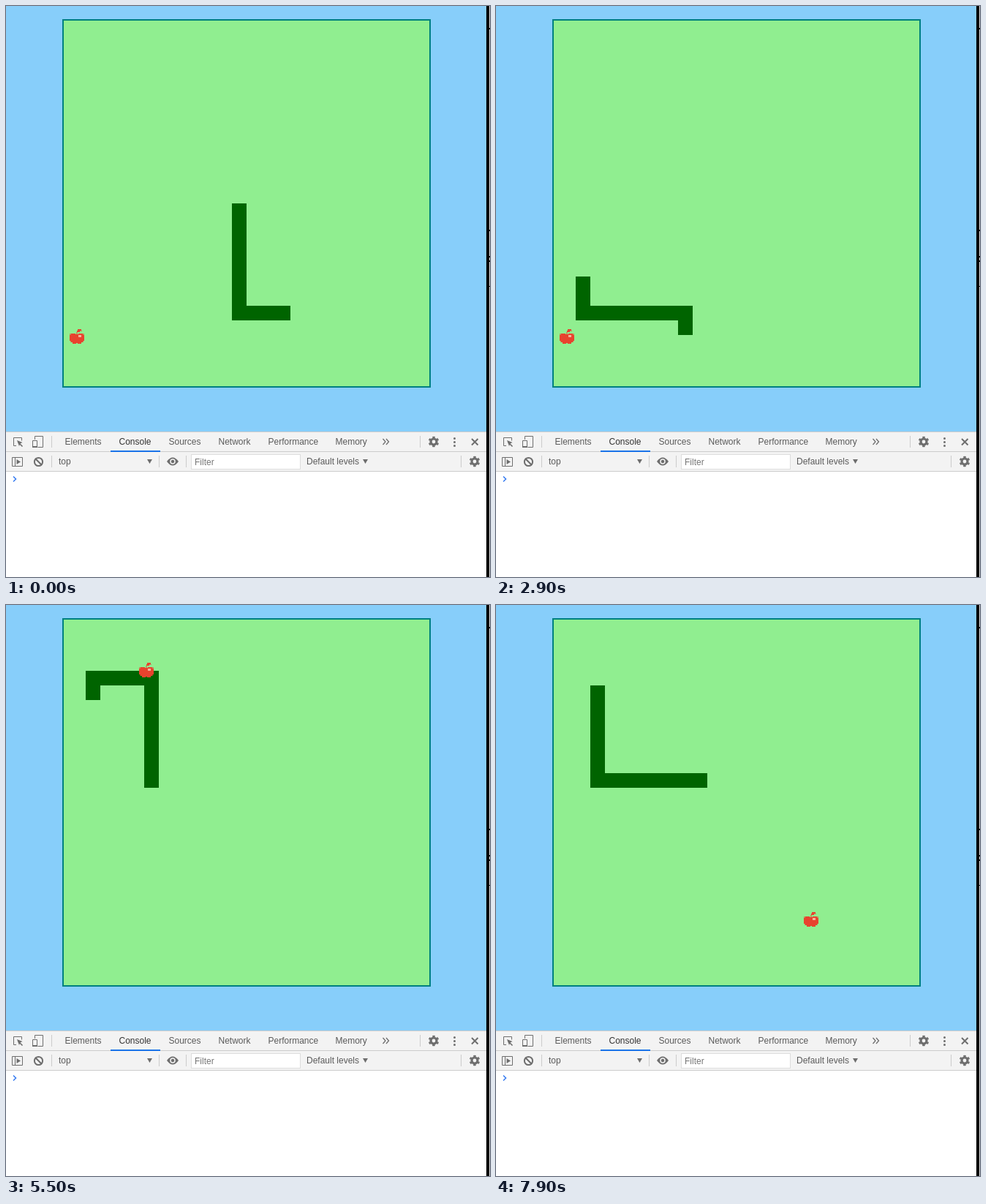
Write an HTML page that moves like this. It is 662 px wide and 781 px high and loops after 8 s.

```html
<!DOCTYPE html>
<html lang="en">
<head>
<meta charset="utf-8">
<title>Snake</title>
<style>
  html, body { margin: 0; width: 100%; height: 100%; overflow: hidden; }
  svg { display: block; }
  text { font: 12px "Liberation Sans", Arial, sans-serif; fill: #5a5a5a; }
  .line { fill: none; stroke: #6e6e6e; }
  .solid { fill: #6e6e6e; }
</style>
</head>
<body>
<svg width="662" height="781" viewBox="0 0 662 781">
  <defs>
    <clipPath id="field"><path d="M79 20h500v500h-500z"/></clipPath>
    <g id="gear" class="line">
      <circle r="4" stroke-width="3.2"/>
      <circle r="6" stroke-width="2.6" pathLength="12" stroke-dasharray="1 1" stroke-dashoffset=".5" transform="rotate(30)"/>
    </g>
  </defs>

  <!-- Game -->
  <rect width="657" height="582" fill="#87cefa"/>
  <rect x="78" y="19" width="502" height="502" fill="#90ee90" stroke="#008080" stroke-width="2"/>
  <g clip-path="url(#field)">
    <polyline id="snake" fill="none" stroke="#006400" stroke-width="20" stroke-linecap="square" stroke-linejoin="miter"/>
  </g>
  <g id="apple" fill="#e8432e" shape-rendering="crispEdges">
    <path d="M11 0h5v2h-2v2h-4v-2h1zM2 6h6v1h4v-1h6v2h2v8h-2v2h-2v2h-5v-1h-2v1h-5v-2h-2v-2h-2v-8h2z"/>
    <path d="M14 2h3v1h-3zM9 4h2v3h-2zM0 6h2v2h-2zM18 6h2v2h-2zM1 16h2v2h-2zM17 16h2v2h-2z" opacity=".5"/>
    <path d="M12 8h4v3h-4z" fill="#f3b49a"/>
  </g>

  <!-- Console panel -->
  <rect y="582" width="657" height="199" fill="#fff"/>
  <rect y="582" width="657" height="55" fill="#f3f3f3"/>
  <path d="M0 582.5h657M0 609.5h657M0 636.5h657M62.5 588v16M566.5 588v16M62.5 615v16M209.5 615v16M246.5 615v16M622.5 615v16" stroke="#ccc"/>
  <rect x="143" y="608" width="68" height="2" fill="#1a73e8"/>
  <rect x="253.5" y="613.5" width="149" height="20" fill="#fff" stroke="#ddd"/>

  <text x="80.5" y="600">Elements</text>
  <text x="154.5" y="600" style="fill:#333">Console</text>
  <text x="222.5" y="600">Sources</text>
  <text x="290.5" y="600">Network</text>
  <text x="358.5" y="600">Performance</text>
  <text x="450.5" y="600">Memory</text>
  <text x="72" y="627">top</text>
  <text x="258" y="628" style="fill:#777">Filter</text>
  <text x="411" y="627">Default levels</text>

  <g class="line">
    <path d="M14 601.5h-3.5v-11h11v4M39.5 593v-4.500h11v15h-7M36.500 594.500h6v9h-6zM8.500 617.500h14v12h-14zM12.500 617.500v12"/>
    <path d="M17 597l5.500 5.500" stroke-width="1.6"/>
    <path d="M515.500 592l3.500 4-3.500 4M520 592l3.500 4-3.500 4" stroke-width="1.3"/>
    <path d="M637 592l8.500 8.500M645.500 592l-8.500 8.500M40 619l9 9" stroke-width="2"/>
    <circle cx="44.500" cy="623.500" r="5.600" stroke-width="2"/>
    <path d="M10 643.500l3.500 3.500-3.500 3.500" stroke="#367cf1" stroke-width="1.5"/>
  </g>
  <g class="solid">
    <path d="M15 594l7.500 3-3 1.500-1.500 3.500zM14.500 620l5.500 3.500-5.500 3.500zM193 620h7l-3.500 6zM488 620h7l-3.500 6z"/>
    <path d="M36 602h7v2h-7zM220 623q8-11 16 0q-8 11-16 0z"/>
    <circle cx="613.500" cy="591.500" r="1.500"/>
    <circle cx="613.500" cy="596.500" r="1.500"/>
    <circle cx="613.500" cy="601.500" r="1.500"/>
  </g>
  <circle cx="228" cy="623" r="3" fill="#6e6e6e" stroke="#f3f3f3" stroke-width="1.500"/>
  <use href="#gear" x="585" y="596"/>
  <use href="#gear" x="641" y="623"/>

  <!-- Window edge -->
  <rect x="657" width="4" height="781" fill="#000"/>
  <rect x="661" width="1" height="781" fill="#ddd"/>
  <path d="M661 30h1v2h-1zM661 306h1v2h-1zM660 342h2v2h-2zM660 348h2v2h-2zM661 383h1v1h-1z"/>
</svg>
<script>
const LOOP = 8000, FRAME = 100, STEP = 59.95, PHASE = 0.63, START = 10;

// Turning points of the route, as column and row
const turns = [
  [11, 13], [11, 20], [15, 20], [15, 7], [1, 7], [1, 20], [8, 20], [8, 25], [0, 25], [0, 17],
  [5, 17], [5, 4], [1, 4], [1, 10], [9, 10], [9, 4], [2, 4], [2, 11], [9, 11]
];
// Move at which each apple appears, and its place
const apples = [[0, 87, 442], [64, 140, 82], [89, 182, 79], [115, 421, 420]];

const route = [turns[0]];
for (const [col, row] of turns.slice(1)) {
  let [c, r] = route.at(-1);
  while (c !== col || r !== row) {
    c += Math.sign(col - c);
    r += Math.sign(row - r);
    route.push([c, r]);
  }
}

const snake = document.getElementById("snake");
const apple = document.getElementById("apple");
const center = ([c, r]) => `${99 + c * 20},${20 + r * 20}`;

function draw(now) {
  const time = Math.floor((now % LOOP) / FRAME) * FRAME;
  const move = Math.floor(time / STEP + PHASE);
  const shown = apples.filter(([at]) => at <= move);
  const [, x, y] = shown.at(-1);
  const length = START + shown.length;
  const head = START + move;
  snake.setAttribute("points", route.slice(head - length + 1, head + 1).map(center).join(" "));
  apple.setAttribute("transform", `translate(${x} ${y})`);
  requestAnimationFrame(draw);
}

draw(0);
</script>
</body>
</html>
```
